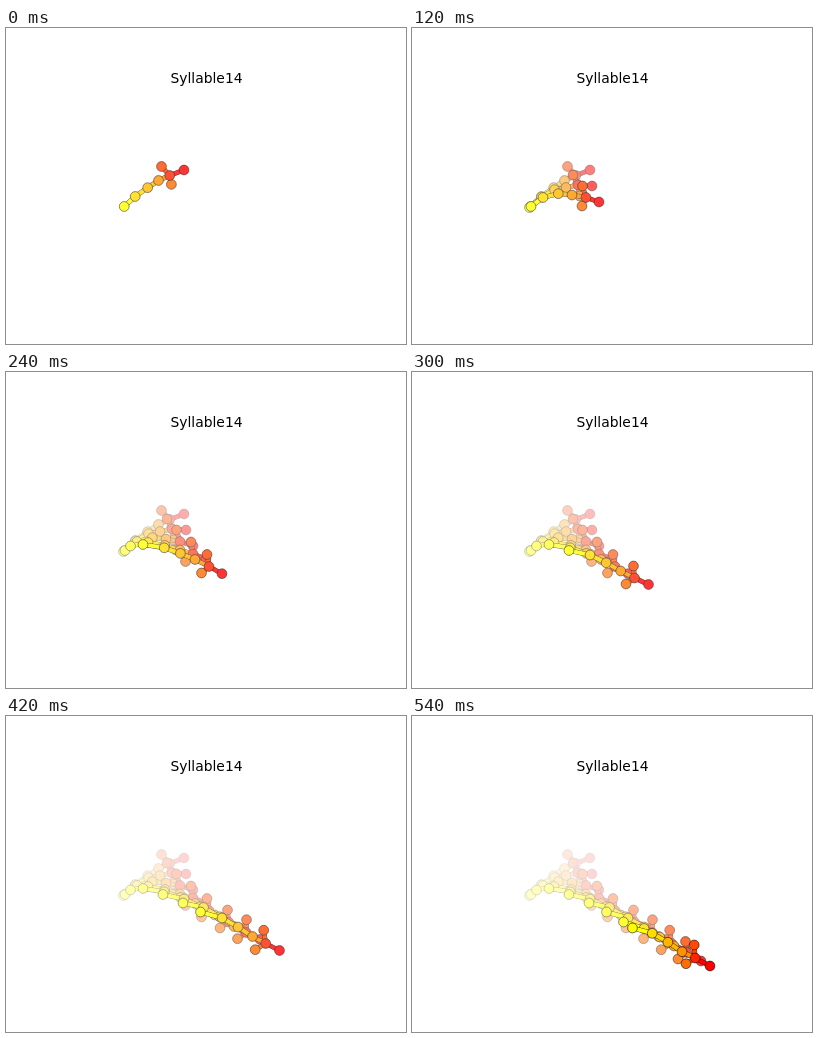
Write an HTML page with a canvas that moves like this. It is 400 px wide and 316 px high and loops after 0.6 s.

```html
<!DOCTYPE html>
<html lang="en">
<head>
<meta charset="utf-8">
<title>Syllable14</title>
<style>
  html, body { margin: 0; width: 100%; height: 100%; overflow: hidden; background: #fff; }
  canvas { display: block; position: absolute; left: 0; top: 0; }
  h1 {
    position: absolute; left: 0; top: 42px; width: 401px; margin: 0;
    font: 13.89px/16px "DejaVu Sans", sans-serif; text-align: center; color: #000;
  }
</style>
</head>
<body>
<canvas id="stage" width="400" height="316"></canvas>
<h1>Syllable14</h1>
<script>
const ctx = document.getElementById('stage').getContext('2d');
const STEP = 60, STEPS = 10, VEIL = 0.2;
const RADIUS = 4.9, LINE = 4.17, RIM = 0.56;

// x, y per step for each keypoint
const tail = [118.2,178.5, 117.5,179.5, 119,178.5, 124.5,174, 137,172.5,
              157,178.5, 177,187, 194.5,196, 211.5,206, 220.5,212];
const hips = [129.2,168.5, 129.5,169, 131,169.5, 142,170.5, 158.2,175.8,
              178,183, 197.5,191.5, 216,202, 232,212.5, 240.2,217.3];
const neck = [152.5,152.5, 154,159.5, 160,167, 174,178, 189,187.5,
              208.7,199, 228,210.5, 246.5,220.5, 262,230, 270,235.7];
const earR = [165.4,156.4, 167.5,168, 170,178, 179.5,189.5, 195.5,201,
              214,212, 231.5,222.7, 249.2,233.7, 266,243, 274,247.7];
const earL = [155.5,138.5, 161,147, 170.5,158, 185,170, 201,182.5,
              221.5,194, 240.5,203.7, 257.7,214.2, 273.5,225.5, 282.2,229];
const head = [163.7,147.5, 166,157, 174,169.5, 187,182, 203,194.5,
              222.5,206, 240.2,216.5, 259.7,227.5, 275,236.5, 283.2,242];
const nose = [178,142, 180,158, 187,174, 200,187, 216,201.7,
              236.5,212.5, 254,223.5, 273.5,234.5, 289,245, 298,250];

const at = (track, i) => [track[2 * i], track[2 * i + 1]];

// The spine point lies midway between hips and neck, arched during the turn
function spine(i) {
  const [hx, hy] = at(hips, i), [nx, ny] = at(neck, i);
  const arch = 2.8 * Math.exp(-((i - 1.5) ** 2) / 1.5);
  return [(hx + nx) / 2 + 0.8, (hy + ny) / 2 - arch - 0.2];
}

const poses = Array.from({ length: STEPS }, (_, i) => [
  at(tail, i), at(hips, i), spine(i), at(neck, i),
  at(earR, i), at(earL, i), at(head, i), at(nose, i)
]);
const colors = poses[0].map((_, k) => `rgb(255,${Math.round(255 * (1 - k / 7))},0)`);
const edges = [[0, 1], [1, 2], [2, 3], [3, 6], [4, 6], [5, 6], [7, 6]];

function line(a, b, color, width) {
  ctx.beginPath();
  ctx.moveTo(...a);
  ctx.lineTo(...b);
  ctx.strokeStyle = color;
  ctx.lineWidth = width;
  ctx.stroke();
}

function drawPose(pose) {
  for (const [a, b] of edges) line(pose[a], pose[b], '#000', LINE + RIM);
  for (const [a, b] of edges) line(pose[a], pose[b], colors[a], LINE);
  pose.forEach(([x, y], k) => {
    ctx.beginPath();
    ctx.arc(x, y, RADIUS, 0, 2 * Math.PI);
    ctx.fillStyle = colors[k];
    ctx.fill();
    ctx.strokeStyle = '#000';
    ctx.lineWidth = RIM;
    ctx.stroke();
  });
}

function fill(color) {
  ctx.fillStyle = color;
  ctx.fillRect(0, 0, 400, 316);
}

// Each pose is veiled in white, except the closing one
function draw(step) {
  fill('#fff');
  for (let i = 0; i <= step; i++) {
    drawPose(poses[i]);
    if (i < STEPS - 1) fill(`rgba(255,255,255,${VEIL})`);
  }
}

let start = null, shown = 0;
function tick() {
  const now = performance.now();
  if (start === null) start = now;
  const step = Math.floor((now - start) / STEP) % STEPS;
  if (step !== shown) draw(shown = step);
  requestAnimationFrame(tick);
}
draw(0);
requestAnimationFrame(tick);
</script>
</body>
</html>
```
